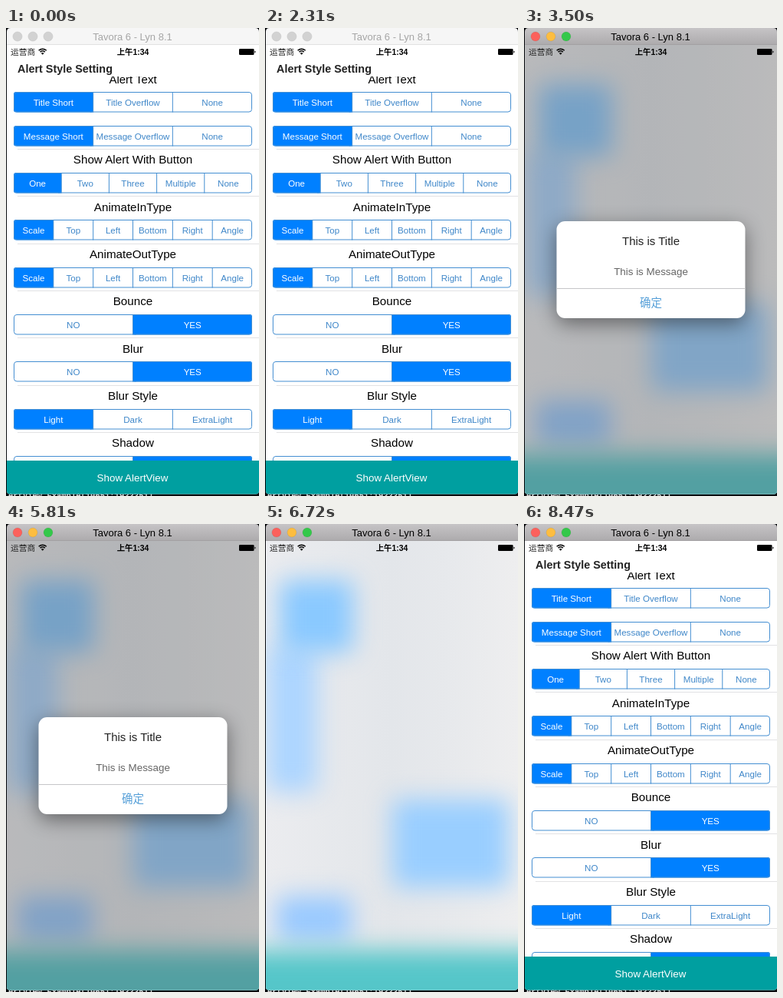
Recreate the animation shown at these times as an HTML page. Size 330 by 608 pixels, loop 8540 ms.

```html
<!DOCTYPE html>
<html lang="en">
<head>
<meta charset="utf-8">
<title>Alert demo</title>
<style>
  html, body { margin: 0; width: 100%; height: 100%; overflow: hidden; background: #0b0d10; }
  svg { display: block; width: 330px; height: 608px; }
  text { font-family: "Liberation Sans", Arial, "Noto Sans CJK SC", "Noto Sans CJK", sans-serif; }
  .soft { filter: blur(16px); }
  .card { filter: drop-shadow(0 7px 13px rgba(0, 0, 0, .45)); }
</style>
</head>
<body>
<svg id="stage" viewBox="0 0 330 608" xmlns="http://www.w3.org/2000/svg">
  <defs>
    <linearGradient id="barFill" x2="0" y2="1">
      <stop offset="0" stop-color="#c6c4c6"/><stop offset="1" stop-color="#acaaac"/>
    </linearGradient>
    <linearGradient id="haze">
      <stop offset="0" stop-color="#ebecef"/><stop offset=".5" stop-color="#e3e6ea"/>
      <stop offset=".72" stop-color="#e7e9ec"/><stop offset="1" stop-color="#eeeeef"/>
    </linearGradient>
    <clipPath id="screen"><path d="M1 22H330V601Q330 605.5 325.5 605.5H5.5Q1 605.5 1 601Z"/></clipPath>
    <clipPath id="scroll"><rect x="1" y="63" width="329" height="500"/></clipPath>
  </defs>
</svg>
<script>
const LOOP = 8540, STEP = 70;
const ACTIVE_AT = 2800, BLUR_IN = 2870, BLUR_OUT = 6790;
const BLUE = '#0080ff', LINE = '#458fd2', LABEL = '#3f87c9';
const stage = document.getElementById('stage');

function add(parent, tag, attrs = {}, content) {
  const el = document.createElementNS('http://www.w3.org/2000/svg', tag);
  for (const key in attrs) el.setAttribute(key, attrs[key]);
  if (content) el.textContent = content;
  parent.appendChild(el);
  return el;
}
const group = (parent, attrs) => add(parent, 'g', attrs);
const rect = (parent, x, y, width, height, fill, extra) =>
  add(parent, 'rect', { x, y, width, height, fill, ...extra });
// y is the middle of the capitals
const label = (parent, str, x, y, size, fill = '#000', extra) =>
  add(parent, 'text', { x, y: y + size * .36, 'font-size': size, fill, 'text-anchor': 'middle', ...extra }, str);

function titleBar(active) {
  const g = group(stage);
  const lights = active ? ['#fc615c', '#fdbd40', '#34c84a'] : ['#d2d2d2', '#d2d2d2', '#d2d2d2'];
  add(g, 'path', { d: 'M1 22V5Q1 0 6 0H325Q330 0 330 5V22Z', fill: active ? 'url(#barFill)' : '#f6f6f6' });
  rect(g, 1, 21.3, 329, .7, active ? '#a09ea0' : '#d8d8d8');
  lights.forEach((fill, i) => add(g, 'circle', {
    cx: 15 + 20 * i, cy: 11, r: 6, fill,
    stroke: active ? 'rgba(0,0,0,.12)' : '#c4c4c4', 'stroke-width': .6
  }));
  label(g, 'Tavora 6 - Lyn 8.1', 165, 11.3, 13, active ? '#000' : '#a6a6a6');
  return g;
}

function segments(parent, y, names, chosen) {
  const x = 10, w = 311, h = 26.5, part = w / names.length;
  const left = x + part * chosen;
  rect(parent, left, y, part, h, BLUE, { rx: 3 });
  // square off the inner edge of the chosen part
  rect(parent, chosen ? left : left + part - 4, y, 4, h, BLUE);
  rect(parent, x + .5, y + .5, w - 1, h - 1, 'none', { rx: 3.5, stroke: LINE });
  names.forEach((name, i) => {
    if (i) rect(parent, x + part * i - .5, y, 1, h, LINE);
    label(parent, name, x + part * (i + .5), y + 13.6, 11.6, i === chosen ? '#fff' : LABEL);
  });
}

function settings(parent) {
  const motions = ['Scale', 'Top', 'Left', 'Bottom', 'Right', 'Angle'];
  const rows = [
    ['Show Alert With Button', ['One', 'Two', 'Three', 'Multiple', 'None'], 0],
    ['AnimateInType', motions, 0],
    ['AnimateOutType', motions, 0],
    ['Bounce', ['NO', 'YES'], 1],
    ['Blur', ['NO', 'YES'], 1],
    ['Blur Style', ['Light', 'Dark', 'ExtraLight'], 0],
    ['Shadow', ['NO', 'YES'], 1]
  ];
  rect(parent, 1, 22, 329, 584, '#fff');
  label(parent, 'Alert Style Setting', 15, 52.8, 14.4, '#222', { 'text-anchor': 'start', 'font-weight': 'bold' });
  const list = group(parent, { 'clip-path': 'url(#scroll)' });
  label(list, 'Alert Text', 165.5, 66.3, 15);
  segments(list, 83, ['Title Short', 'Title Overflow', 'None'], 0);
  segments(list, 127, ['Message Short', 'Message Overflow', 'None'], 0);
  rows.forEach(([name, parts, chosen], i) => {
    const y = 171 + i * 61.3;
    rect(list, 15, Math.round(y - 14), 315, 1, '#e2e2e4');
    label(list, name, 165.5, y, 15.2);
    segments(list, Math.round(y + 17), parts, chosen);
  });
  rect(parent, 1, 562, 329, 44, '#009fa0');
  label(parent, 'Show AlertView', 165, 584.5, 13.4, '#fff');
}

function backdrop(parent) {
  rect(parent, 1, 22, 329, 584, 'url(#haze)');
  const blobs = [
    [2, 160, 66, 188, '#acd5ff'],
    [19, 73, 96, 94, '#8ac9ff'],
    [166, 358, 152, 114, '#99ceff'],
    [15, 484, 98, 58, '#98c9ff'],
    [-50, 554, 430, 130, '#55c6c9']
  ];
  for (const [x, y, w, h, fill] of blobs) rect(parent, x, y, w, h, fill, { class: 'soft', rx: 8 });
}

function statusBar() {
  const g = group(stage);
  label(g, '运营商', 6, 31, 10.7, '#222', { 'text-anchor': 'start' });
  for (const r of [7.2, 4.5]) {
    const d = r * .7;
    add(g, 'path', {
      d: `M${47.7 - d} ${34.3 - d}A${r} ${r} 0 0 1 ${47.7 + d} ${34.3 - d}`,
      fill: 'none', stroke: '#000', 'stroke-width': 1.5
    });
  }
  add(g, 'path', { d: 'M47.7 34.8L45.8 32.7Q47.7 31.1 49.6 32.7Z' });
  label(g, '上午1:34', 165.5, 31, 10.4, '#000', { 'font-weight': 'bold' });
  rect(g, 304, 27, 19.5, 8, '#000', { rx: 1.3 });
  rect(g, 324.2, 29.7, 1.2, 2.6, '#222', { rx: .6 });
}

// centred on its own origin
function alertCard(parent) {
  const g = group(parent, { class: 'card' });
  rect(g, -123, -63, 246, 126, '#fff', { rx: 11 });
  rect(g, -123, 24, 246, 1, '#c6c6c8');
  label(g, 'This is Title', 0, -37.3, 15, '#222');
  label(g, 'This is Message', 0, 2.4, 13.4, '#666');
  label(g, '确定', 0, 43, 14.5, '#559fd8');
  return g;
}

label(stage, 'ertView Example[10651:1933351]', 3, 607.4, 10.5, '#ddd',
  { 'text-anchor': 'start', style: 'font-family:"Liberation Mono",monospace;font-weight:bold' });
const idleBar = titleBar(false), activeBar = titleBar(true);
const screen = group(stage, { 'clip-path': 'url(#screen)' });
settings(screen);
const overlay = group(screen);
backdrop(overlay);
const dim = rect(overlay, 1, 22, 329, 584, '#505050');
const holder = group(overlay);
alertCard(holder);
statusBar();

const SCALE = [
  [2870, .42], [2940, .677], [3010, .9], [3080, 1.03], [3150, 1.06], [3220, 1.04],
  [3290, 1.01], [3360, .995], [3430, 1], [6370, 1], [6440, 1.05], [6510, 1.02],
  [6580, .65], [6650, .25], [6720, 0]
];
const DIM = [[2800, 0], [2940, .32], [6440, .32], [6720, 0]];

function valueAt(track, t) {
  const i = track.findIndex(([time]) => time >= t);
  if (i < 0) return track[track.length - 1][1];
  if (i === 0) return track[0][1];
  const [t0, a] = track[i - 1], [t1, b] = track[i];
  return a + (b - a) * (t - t0) / (t1 - t0);
}

const show = (el, on) => el.setAttribute('display', on ? 'inline' : 'none');
const start = performance.now();

function draw() {
  const elapsed = Math.max(0, performance.now() - start);
  const t = Math.floor((elapsed % LOOP) / STEP) * STEP;
  const scale = valueAt(SCALE, t);
  show(idleBar, t < ACTIVE_AT);
  show(activeBar, t >= ACTIVE_AT);
  show(overlay, t >= BLUR_IN && t < BLUR_OUT);
  show(holder, scale > 0);
  holder.setAttribute('transform', `translate(165.5 314) scale(${scale})`);
  dim.setAttribute('opacity', valueAt(DIM, t));
  requestAnimationFrame(draw);
}
draw();
</script>
</body>
</html>
```
